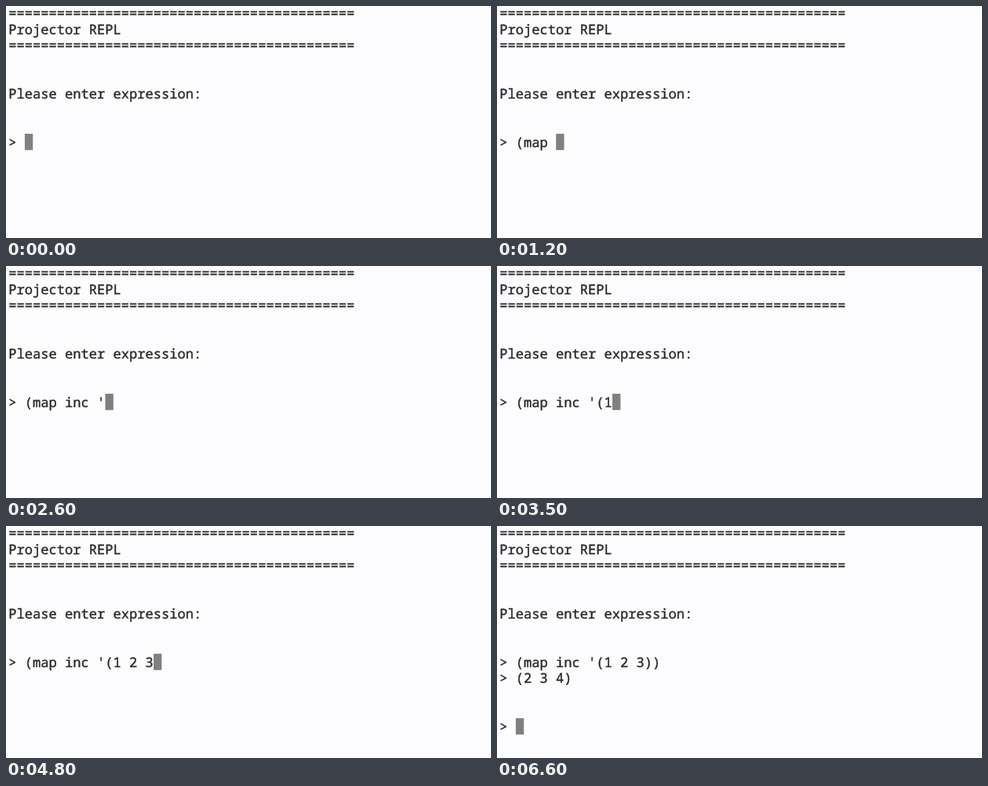
Write an HTML page that moves like this. It is 618 px wide and 296 px high and loops after 8 s.

```html
<!DOCTYPE html>
<html lang="en">
<head>
<meta charset="utf-8">
<title>Projector REPL</title>
<style>
  html, body { margin: 0; width: 100%; height: 100%; overflow: hidden; background: #fdfcfe; }
  svg { display: block; width: 618px; height: 296px; }
  text {
    font: 17.1px "Noto Sans Mono", monospace;
    fill: #2a2a2a; stroke: #2a2a2a; stroke-width: 0.4px;
    white-space: pre; text-rendering: geometricPrecision;
  }
</style>
</head>
<body>
<svg viewBox="0 0 618 296">
  <rect width="618" height="296" fill="#fdfcfe"/>
  <rect id="cursor" width="10.3" height="20.8" fill="#808080"/>
  <g id="lines"></g>
</svg>
<script>
const LOOP = 8000;
const LEFT = 3.2, COL = 10.26, ROW = 20.55, BASE = 15.2;
const PROMPT_ROW = 8;
const INPUT = "(map inc '(1 2 3))";
const KEY_TIMES = [100, 500, 700, 800, 1200, 1400, 1500, 1800, 1900,
                   2600, 2900, 3500, 3800, 4000, 4300, 4800, 5800, 6100];
const ENTER = 6500, ANSWER = 6600;

const cursor = document.getElementById("cursor");
const lines = document.getElementById("lines");

function addLine(row, content = "") {
  const line = document.createElementNS("http://www.w3.org/2000/svg", "text");
  line.setAttribute("x", LEFT);
  line.setAttribute("y", BASE + row * ROW);
  line.textContent = content;
  lines.append(line);
  return line;
}

function setText(line, content) {
  if (line.textContent !== content) line.textContent = content;
}

function moveCursor(col, row) {
  cursor.setAttribute("x", LEFT + 0.2 + col * COL);
  cursor.setAttribute("y", row * ROW - 1.4);
}

const rule = "=".repeat(43);
addLine(0, rule);
addLine(1, "Projector REPL");
addLine(2, rule);
addLine(5, "Please enter expression:");
const input = addLine(PROMPT_ROW);
const result = addLine(PROMPT_ROW + 1);
const prompt = addLine(PROMPT_ROW + 4);

function draw(t) {
  const typed = KEY_TIMES.filter(k => k <= t).length;
  const answered = t >= ANSWER;
  setText(input, "> " + INPUT.slice(0, typed));
  setText(result, answered ? "> (2 3 4)" : "");
  setText(prompt, answered ? ">" : "");

  if (answered) moveCursor(2, PROMPT_ROW + 4);
  else if (t >= ENTER) moveCursor(0, PROMPT_ROW + 1);
  else moveCursor(2 + typed, PROMPT_ROW);
}

const start = performance.now();
function tick() {
  draw((performance.now() - start) % LOOP);
  requestAnimationFrame(tick);
}
draw(0);
requestAnimationFrame(tick);
</script>
</body>
</html>
```
